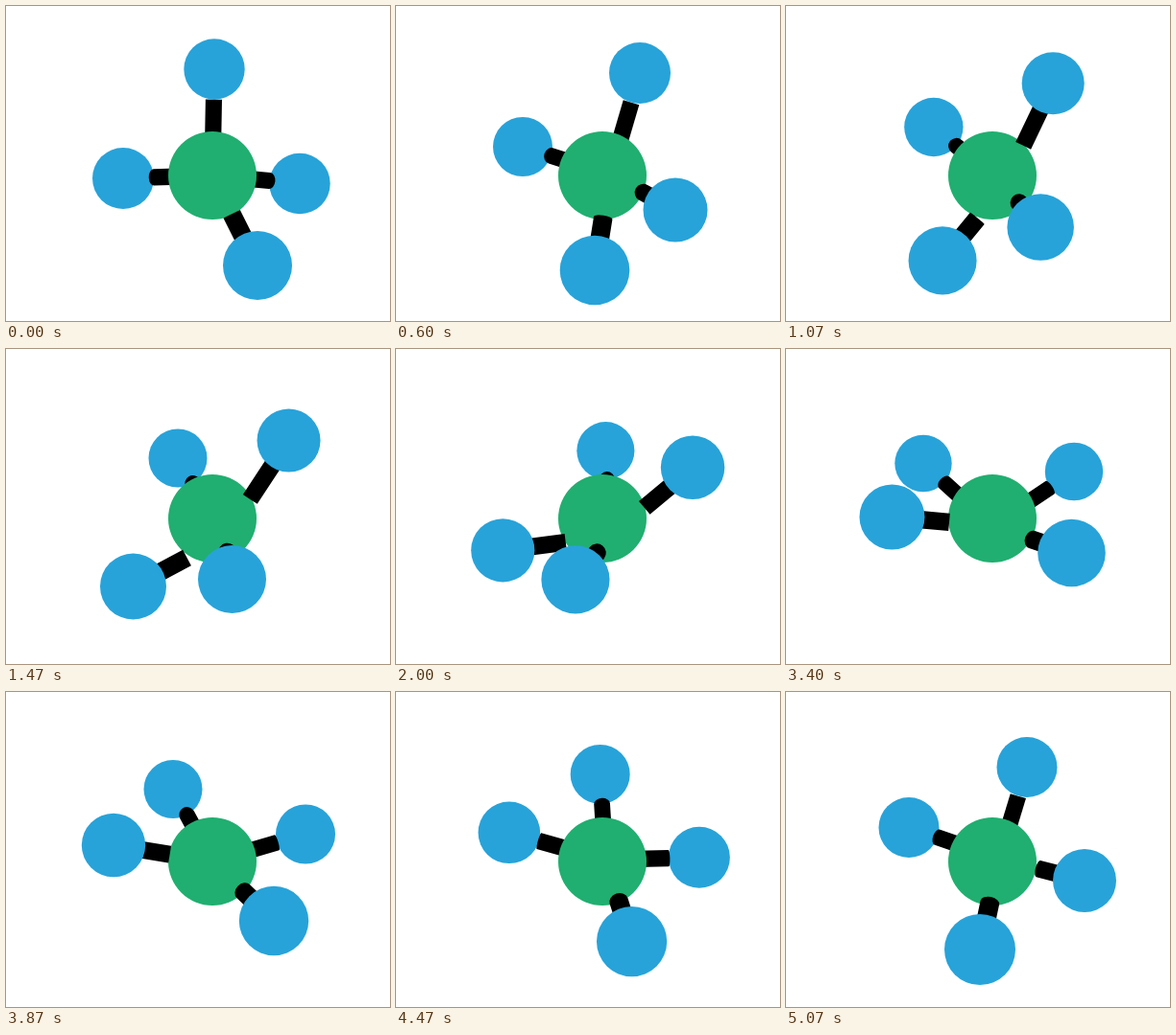
Write an HTML page with a canvas that moves like this. It is 400 px wide and 329 px high and loops after 5140 ms.

```html
<!DOCTYPE html>
<html>
<head>
<meta charset="utf-8">
<style>
html, body { margin: 0; height: 100%; overflow: hidden; background: #fff; }
canvas { display: block; }
</style>
</head>
<body>
<canvas id="stage" width="400" height="329"></canvas>
<script>
const ctx = document.getElementById('stage').getContext('2d');
const LOOP = 5140, CORE = 46, BLUE = '#27a3d9', GREEN = '#20af70';

// Poses relative to the core: atoms as x, y, radius; the joint is where the bonds aim.
const times = [0, 600, 1470, 2130, 2600, 3400, 3870, 4600, 5070];
const atoms = [
  [[2, -111, 31.7], [39, -107, 32], [79.5, -81.5, 33], [96, -45.5, 33.3], [97, -16, 33.5],
   [82.5, 36, 35.3], [64, 62, 36.2], [22, 86.5, 36.7], [-13, 92, 37]],
  [[-93, 3, 32], [-83, -30, 31], [-36, -63, 30.5], [13, -71.5, 30], [46, -70, 30],
   [85, -49, 30.2], [97, -28.5, 31], [100.5, 1, 32.2], [96, 20, 33]],
  [[91, 8.5, 31.7], [76, 36, 33.5], [20.5, 63.5, 35.5], [-40, 61, 35.5], [-81, 40, 35],
   [-104.5, -1.5, 34], [-103, -17, 33.2], [-95.3, -32, 32.1], [-87, -35.5, 31.5]],
  [[47, 94, 36], [-8, 99, 36.3], [-82.5, 71, 34.5], [-106, 23.5, 32.7], [-104.5, -11, 31],
   [-72, -57.5, 29.7], [-41, -75.5, 30.5], [6, -93.4, 31.1], [36, -98.5, 31.5]]
];
const joint = [[0, 0], [8, -1], [13, 20], [6, 18], [-2, 14], [0, 8], [0, 0], [4, -2], [7, -3]];

const clamp = v => Math.max(0, Math.min(1, v));

// Smooth curve through unevenly spaced keys
function sample(keys, t) {
  const last = times.length - 1;
  let i = 0;
  while (i < last - 1 && t >= times[i + 1]) i++;
  const h = times[i + 1] - times[i], u = (t - times[i]) / h, v = 1 - u;
  return keys[0].map((_, c) => {
    const slope = j => (keys[j + 1][c] - keys[j][c]) / (times[j + 1] - times[j]);
    const tangent = j => {
      if (j === 0) return 2 * slope(0) - tangent(1);
      if (j === last) return 2 * slope(last - 1) - tangent(last - 1);
      const a = times[j] - times[j - 1], b = times[j + 1] - times[j];
      return (slope(j - 1) * b + slope(j) * a) / (a + b);
    };
    return keys[i][c] * v * v * (1 + 2 * u) + keys[i + 1][c] * u * u * (3 - 2 * u)
      + h * u * v * (tangent(i) * v - tangent(i + 1) * u);
  });
}

function disc(x, y, r, color) {
  ctx.fillStyle = color;
  ctx.beginPath();
  ctx.arc(x, y, r, 0, 2 * Math.PI);
  ctx.fill();
}

// Cylinder whose round ends flatten as it turns side-on
function bond(x1, y1, x2, y2, width, tilt) {
  const length = Math.hypot(x2 - x1, y2 - y1), half = width / 2;
  ctx.save();
  ctx.translate(x1, y1);
  ctx.rotate(Math.atan2(y2 - y1, x2 - x1));
  ctx.fillStyle = '#000';
  ctx.beginPath();
  ctx.ellipse(0, 0, half * tilt, half, 0, Math.PI / 2, Math.PI * 1.5);
  ctx.ellipse(length, 0, half * tilt, half, 0, -Math.PI / 2, Math.PI / 2);
  ctx.fill();
  ctx.restore();
}

function drawArm([x, y, r], [jx, jy], front) {
  const reach = Math.hypot(x, y), tilt = clamp((104 - reach) / 18), width = r * 0.54;
  if (front) {
    const q = Math.min(45 / reach, (reach - 28) / 110);
    bond(jx + (x - jx) * q, jy + (y - jy) * q, x, y, width, tilt);
    disc(x, y, r, BLUE);
  } else {
    const q = 1 - r / Math.hypot(x - jx, y - jy);
    disc(x, y, r, BLUE);
    bond(jx, jy, jx + (x - jx) * q, jy + (y - jy) * q, width, tilt);
  }
}

function draw(t) {
  const hub = sample(joint, t);
  const pose = atoms.map(keys => sample(keys, t)).sort((a, b) => a[2] - b[2]);
  const isFront = atom => atom[2] > 32.4;
  ctx.setTransform(1, 0, 0, 1, 0, 0);
  ctx.fillStyle = '#fff';
  ctx.fillRect(0, 0, 400, 329);
  ctx.translate(215, 177);
  pose.filter(a => !isFront(a)).forEach(a => drawArm(a, hub, false));
  disc(0, 0, CORE, GREEN);
  pose.filter(isFront).forEach(a => drawArm(a, hub, true));
}

// Fifteen steps a second, starting on multiples of 10 ms
function frame() {
  const t = performance.now() % LOOP;
  const step = Math.min(76, Math.floor((Math.floor(t / 10) * 10 + 4) * 3 / 200));
  draw(Math.round(step * 20 / 3) * 10);
  requestAnimationFrame(frame);
}
frame();
</script>
</body>
</html>
```
